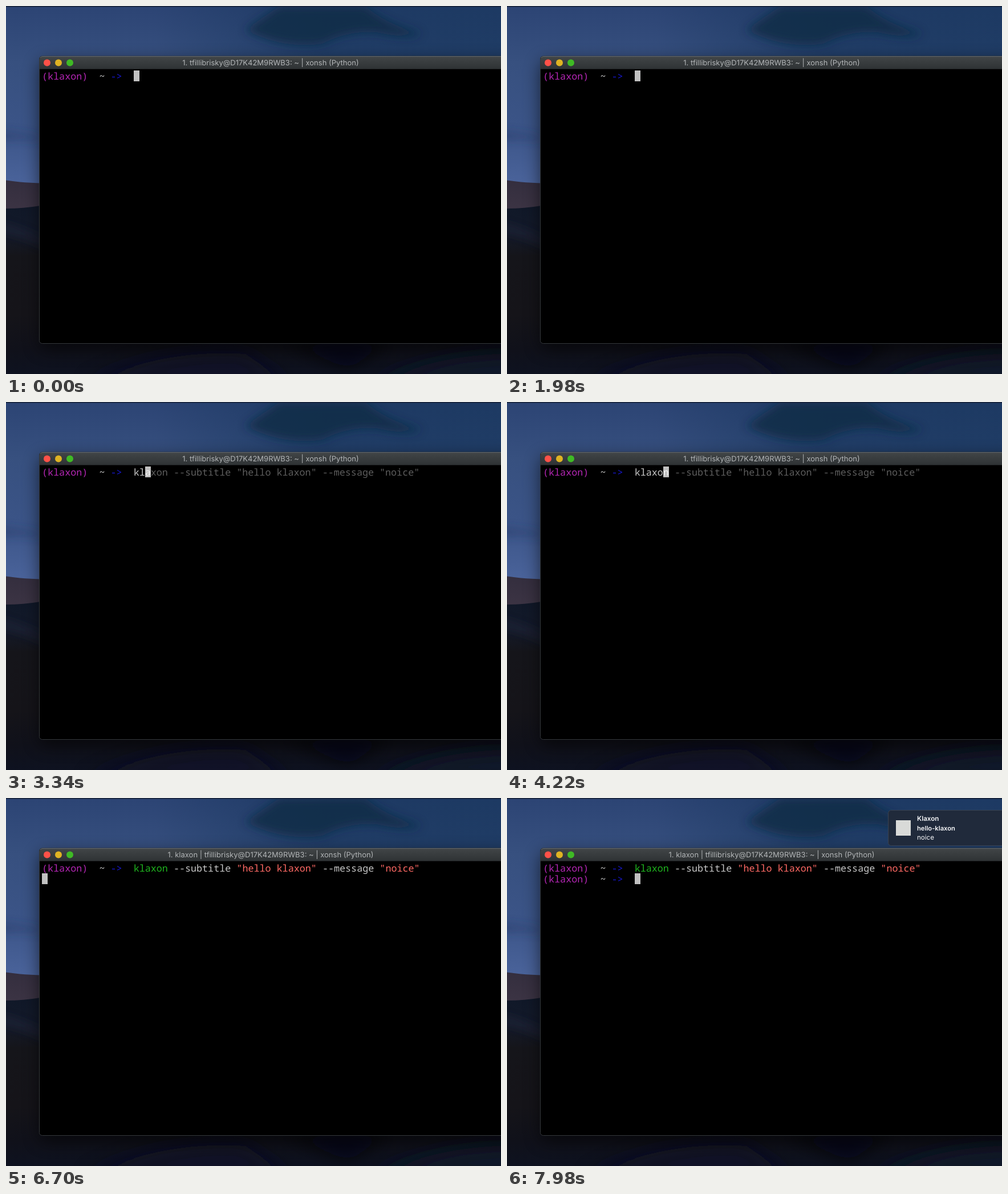
These frames come from a looping animation (868 by 645 pixels, 8 s). An HTML page:

```html
<!DOCTYPE html>
<html lang="en">
<head>
<meta charset="utf-8">
<title>Terminal notification</title>
<style>
  html, body { margin: 0; width: 100%; height: 100%; overflow: hidden; background: #0b0d17; }
  svg { display: block; width: 868px; height: 645px; }
  text { white-space: pre; text-rendering: geometricPrecision; }
  #title { font: 13px Inter, Roboto, sans-serif; fill: #b3b6b8; text-anchor: middle; }
  #terminal { font: 16.73px "Noto Sans Mono", "DejaVu Sans Mono", monospace; font-variant-ligatures: none; }
  #banner text { font: 600 11.6px Inter, Roboto, sans-serif; fill: #f8f9fb; }
</style>
</head>
<body>
<svg viewBox="0 0 868 645">
  <defs>
    <linearGradient id="sky" x2="0" y2="1">
      <stop offset="0" stop-color="#2c4474"/>
      <stop offset=".3" stop-color="#37507f"/>
      <stop offset=".65" stop-color="#3b5487"/>
      <stop offset="1" stop-color="#4d669e"/>
    </linearGradient>
    <linearGradient id="skyShade">
      <stop offset=".3" stop-color="#18365d" stop-opacity="0"/>
      <stop offset=".65" stop-color="#18365d" stop-opacity=".7"/>
      <stop offset="1" stop-color="#18365d" stop-opacity=".75"/>
    </linearGradient>
    <linearGradient id="dune" x2="0" y2="1">
      <stop offset="0" stop-color="#342e3e"/>
      <stop offset="1" stop-color="#3c3444"/>
    </linearGradient>
    <linearGradient id="valley" x2="0" y2="1">
      <stop offset="0" stop-color="#101828"/>
      <stop offset=".16" stop-color="#141a2a"/>
      <stop offset=".3" stop-color="#15151a"/>
      <stop offset=".65" stop-color="#151419"/>
      <stop offset=".85" stop-color="#10111a"/>
      <stop offset="1" stop-color="#0e1220"/>
    </linearGradient>
    <linearGradient id="bar" x2="0" y2="1">
      <stop offset="0" stop-color="#414547"/>
      <stop offset="1" stop-color="#2e3234"/>
    </linearGradient>
    <filter id="soft" x="-30%" y="-50%" width="160%" height="200%"><feGaussianBlur stdDeviation="8"/></filter>
    <filter id="haze" x="-30%" y="-80%" width="160%" height="260%"><feGaussianBlur stdDeviation="16"/></filter>
    <filter id="shadow" x="-10%" y="-10%" width="120%" height="120%"><feGaussianBlur stdDeviation="15"/></filter>
  </defs>

  <!-- Night desert -->
  <rect width="868" height="330" fill="url(#sky)"/>
  <rect width="868" height="330" fill="url(#skyShade)"/>
  <g filter="url(#soft)">
    <path d="M420 42Q450 20 480 0H630Q665 32 728 48Q705 58 650 46Q600 42 555 66Q485 76 420 42Z" fill="#152c47" opacity=".8"/>
    <path d="M-20 220Q15 222 60 230V236Q15 230 -20 236Z" fill="#293e6b" opacity=".7"/>
  </g>
  <path d="M0 305.500Q30 310 75 311V360H0Z" fill="url(#dune)"/>
  <path d="M0 355Q30 355 60 350H868V645H0Z" fill="url(#valley)"/>
  <path d="M-10 380Q35 393 70 412V422Q30 402 -10 394Z" fill="#20263a" opacity=".7" filter="url(#soft)"/>
  <g filter="url(#haze)">
    <path d="M140 665Q270 600 420 610L500 665Z" fill="#141529" opacity=".7"/>
    <path d="M480 590H680L600 635Z" fill="#07080e" opacity=".7"/>
    <path d="M640 665Q760 607 900 610V665Z" fill="#141a2e" opacity=".8"/>
  </g>
  <rect width="868" height="1.500" fill="#141f35"/>

  <!-- Terminal window -->
  <rect x="59" y="98" width="840" height="503" rx="8" fill="#000" opacity=".6" filter="url(#shadow)"/>
  <rect x="58.500" y="88" width="830" height="503.500" rx="5" fill="#000" stroke="#34383b"/>
  <path d="M59 111V93.500Q59 88.500 64 88.500H868V111Z" fill="url(#bar)"/>
  <path d="M60 91Q61 88.500 64 88.500H868" fill="none" stroke="#63676a"/>
  <rect x="59" y="110" width="809" height="1" fill="#1b1d1f"/>
  <circle cx="72" cy="99.500" r="6" fill="#ff5148"/>
  <circle cx="92" cy="99.500" r="6" fill="#dfb323"/>
  <circle cx="112" cy="99.500" r="6" fill="#3fba25"/>
  <text id="title" x="464" y="104"></text>
  <g id="terminal"></g>

  <!-- Notification -->
  <g id="banner">
    <rect x="668.500" y="21.500" width="330" height="62" rx="5" fill="#202a3b" stroke="#3a4352"/>
    <rect x="682" y="39" width="26" height="27" fill="#d9dad8"/>
    <text x="719" y="40">Klaxon</text>
    <text x="719" y="57" style="font-size:11.2px">hello-klaxon</text>
    <text x="719" y="73" style="font-weight:400;font-size:11.600px">noice</text>
  </g>
</svg>
<script>
const LOOP = 8000, LEFT = 63, TOP = 113, CELL = 10.04, ROW = 19, START = 16;
const KEY_TIMES = [2900, 3200, 3600, 3850, 4120, 4460];
const ACCEPT = 5000, ENTER = 6150, PROMPT = 7350, SLIDE = 7560, SLIDE_END = 7960;
const WHITE = '#c7c7c7', GREY = '#5d5d5d', GREEN = '#1fb51f', RED = '#ff6964';
const PROGRAM = 'klaxon';
const COMMAND = [[PROGRAM, GREEN], [' --subtitle ', WHITE], ['"hello klaxon"', RED],
                 [' --message ', WHITE], ['"noice"', RED]];
const LINE = COMMAND.map(([text]) => text).join('');
const SHELL = 'tfillibrisky@D17K42M9RWB3: ~ | xonsh (Python)';

const byId = id => document.getElementById(id);
const title = byId('title'), terminal = byId('terminal'), banner = byId('banner');

const write = (text, col, row, color) =>
  `<text x="${LEFT + col * CELL}" y="${TOP + row * ROW + 15.5}" fill="${color}">${text.replace('>', '&gt;')}</text>`;

const cursor = (col, row) =>
  `<rect x="${Math.round(LEFT + col * CELL)}" y="${TOP + row * ROW}" width="10" height="19" fill="#c1c1c1"/>`;

const prompt = row => write('(klaxon)', 0, row, '#b526b5') +
  write('~', 10, row, WHITE) + write('->', 12, row, '#1717cf');

function fullCommand() {
  let col = START;
  return COMMAND.map(([text, color]) => {
    const part = write(text, col, 0, color);
    col += text.length;
    return part;
  }).join('');
}

function typedCommand(count) {
  const col = START + count;
  if (!count) return cursor(col, 0);
  const color = count === PROGRAM.length ? GREEN : WHITE;
  return write(LINE.slice(0, count), START, 0, color) + write(LINE.slice(count), col, 0, GREY) +
    cursor(col, 0) + write(LINE[count], col, 0, '#f4f4f4');
}

function screen(time) {
  const first = prompt(0);
  if (time < ACCEPT) return first + typedCommand(KEY_TIMES.filter(key => key <= time).length);
  const line = first + fullCommand();
  if (time < ENTER) return line + cursor(START + LINE.length, 0);
  if (time < PROMPT) return line + cursor(0, 1);
  return line + prompt(1) + cursor(START, 1);
}

let shown = '';
function draw() {
  const time = performance.now() % LOOP;
  const next = screen(time);
  if (next !== shown) terminal.innerHTML = shown = next;
  title.textContent = '1. ' + (time < ENTER ? '' : 'klaxon | ') + SHELL;

  const progress = Math.min(1, Math.max(0, (time - SLIDE) / (SLIDE_END - SLIDE)));
  banner.setAttribute('transform', `translate(${210 * (1 - progress) ** 3} 0)`);
  requestAnimationFrame(draw);
}
draw();
</script>
</body>
</html>
```
